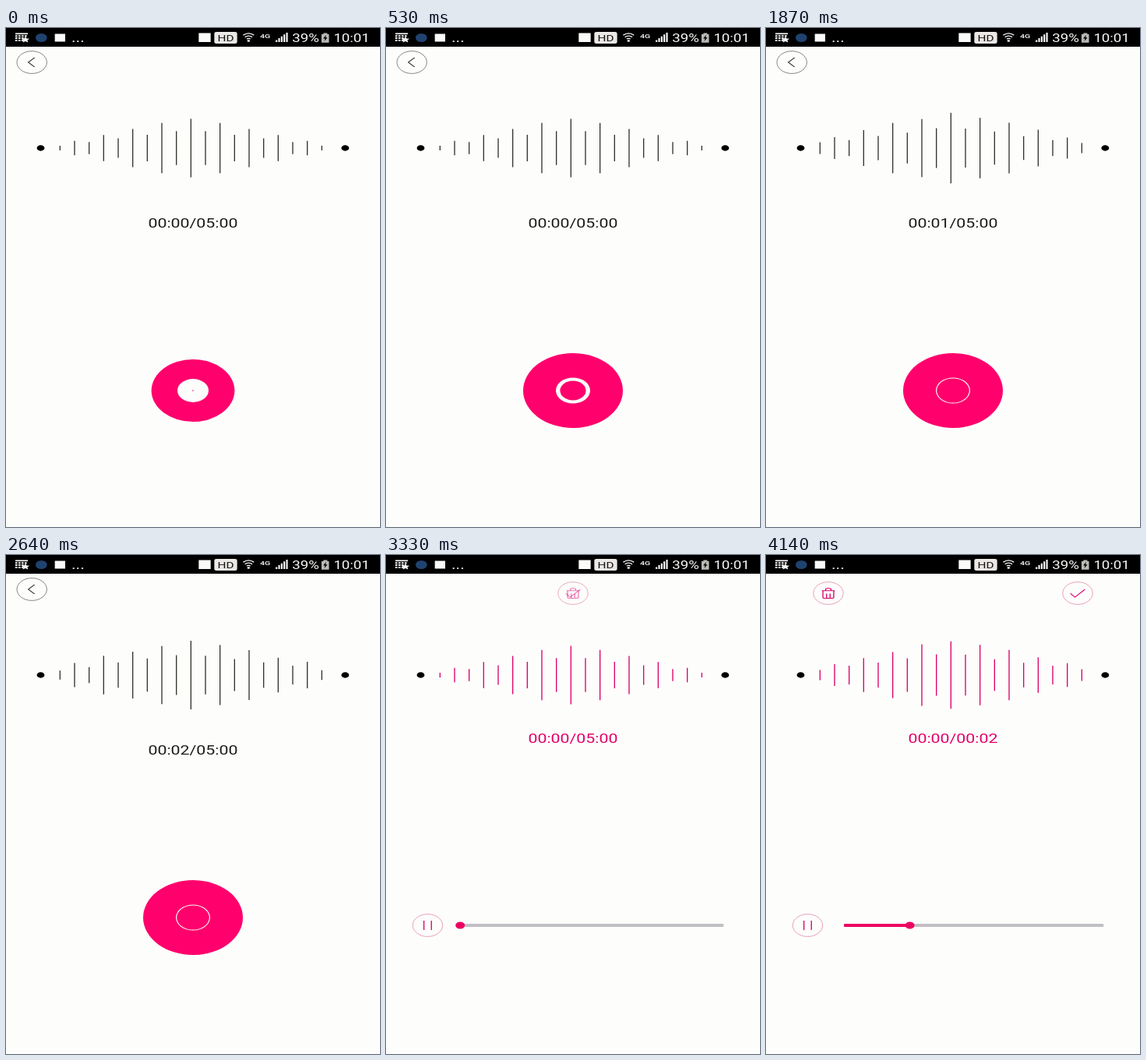
An HTML page for the animation above (4180 ms loop, 480 px wide and 640 px high).

```html
<!DOCTYPE html>
<html lang="en">
<head>
<meta charset="utf-8">
<title>Voice recorder</title>
<style>
  html, body { margin: 0; width: 100%; height: 100%; overflow: hidden; background: #fdfdfc; }
  svg { display: block; width: 100vw; height: 100vh; }
  text { font-family: Roboto, "Noto Sans", sans-serif; }
  .line { fill: none; stroke-width: 1; }
  .thin { fill: none; stroke-width: .6; }
  .red { stroke: #dc0068; }
  .rim { stroke: #e0789f; }
</style>
</head>
<body>
<!-- The phone screen is 360 x 640 dp, widened to fill the stage. -->
<svg viewBox="0 0 360 640" preserveAspectRatio="none">
  <rect width="360" height="640" fill="#fdfdfc"/>

  <g id="status" fill="#fafaf8">
    <rect width="360" height="24" fill="#000"/>
    <g class="line" stroke="#fafaf8">
      <path d="M9 7.3H21" stroke-width="1.7"/>
      <path d="M9 10.2H21M9 13H17M9 16H17" stroke-width="1.9" stroke-dasharray="2 1"/>
      <path d="M228.3 9.3Q233.5 4.6 238.7 9.3M230 11.8Q233.5 8.6 237 11.8M231.7 14.1Q233.5 12.6 235.3 14.1" stroke-width="1.2"/>
      <path id="signal" stroke-width="1.6"/>
    </g>
    <path d="M18.7 10.8l1.2 2.6 2.8.3-2.1 1.9.6 2.8-2.5-1.4-2.5 1.4.6-2.8-2.1-1.9 2.8-.3z"/>
    <circle cx="34" cy="12.5" r="5.5" fill="#1f4370"/>
    <rect x="47" y="7.5" width="10" height="10"/>
    <text x="63" y="17.7" font-size="16">...</text>
    <rect x="185.5" y="6.5" width="11.5" height="11.5"/>
    <rect x="200.5" y="5" width="22" height="15" rx="2" fill="#ebe8e6"/>
    <text x="211.6" y="16.6" font-size="11.5" text-anchor="middle" fill="#111">HD</text>
    <circle cx="233.5" cy="16.5" r="1.3"/>
    <text x="244.5" y="13" font-size="8" font-weight="500">4G</text>
    <text x="275.5" y="17.7" font-size="14">39%</text>
    <path d="M305.5 6.5h3.8v1.5h1.6v10.8h-7.2V8h1.8z" fill="#b9b9b5"/>
    <path d="M308.3 8.8l-3 4.6h1.8l-.7 3.6 3-4.7h-1.8z" fill="#000"/>
    <text x="315.3" y="17.7" font-size="14">10:01</text>
  </g>

  <circle cx="33.4" cy="154" r="3.7"/>
  <circle cx="326.5" cy="154" r="3.7"/>
  <path id="wave" class="line"/>
  <text id="timer" x="180" font-size="16" text-anchor="middle"></text>

  <g id="record">
    <g class="thin" stroke="#55554c">
      <circle cx="24.9" cy="44" r="14.4"/>
      <path d="M27.5 38L21.5 44L27.5 50" stroke="#222" stroke-width="1"/>
    </g>
    <g transform="translate(180 465)">
      <circle id="disc" fill="#ff006c"/>
      <circle id="hole" fill="#fdfdfc"/>
      <circle id="core" fill="#ff006c"/>
    </g>
  </g>

  <g id="play">
    <g id="bin">
      <circle class="thin rim" r="14.4"/>
      <path class="line red" d="M-6.3 -3.2H6.3M-2.6 -3.2V-4.4Q-2.6 -6.2 -.9 -6.2H.9Q2.6 -6.2 2.6 -4.4V-3.2M-5.2 -3.2V5Q-5.2 6.6 -3.6 6.6H3.6Q5.2 6.6 5.2 5V-3.2M-1.7 .4V6M1.7 .4V6"/>
    </g>
    <g id="tick">
      <circle class="thin rim" r="14.4"/>
      <path class="line red" d="M-7 .3L-2.6 5L7 -4.8"/>
    </g>
    <g transform="translate(40.1 475)">
      <circle class="thin rim" r="14.4"/>
      <path class="line red" d="M-3.6 -6V6M3.6 -6V6"/>
    </g>
    <rect x="75" y="473" width="250" height="4" rx="1.2" fill="#c1bfc4"/>
    <rect id="bar" x="75" y="473" height="4" rx="1.2" fill="#ee0062"/>
    <circle id="knob" cy="475" r="4.5" fill="#ee0062"/>
  </g>
</svg>

<script>
const LOOP = 4180;
const RECORD = 1100, STOP = 3290, SPLIT = 3335, PLAY = 3618, SOUND = 3850;
const LEVEL_STEP = 154, SEEK_STEP = 58;

const $ = id => document.getElementById(id);
const set = (id, attrs) => {
  for (const key in attrs) $(id).setAttribute(key, attrs[key]);
};
const clamp = v => Math.min(1, Math.max(0, v));
const decelerate = t => 1 - (1 - t) ** 2;
const overshoot = t => (t - 1) ** 2 * (3 * (t - 1) + 2) + 1;
const random = seed => {
  const v = Math.sin(seed * 12.9898) * 43758.5453;
  return v - Math.floor(v);
};
const repeat = (n, fn) => Array.from({ length: n }, (_, i) => fn(i)).join("");

// Tall and short bars alternate, each kind rising evenly to the middle.
function wavePath(ms) {
  const level = Math.floor((ms - RECORD) / LEVEL_STEP);
  const loud = (ms >= RECORD && ms < STOP) || ms >= SOUND;
  return repeat(19, i => {
    const k = 9 - Math.abs(9 - i);
    const tall = k % 2;
    const rest = tall ? Math.min(37.5, 5.3 + 3.85 * k) : 2.9 + 2.37 * k;
    const grow = (tall ? 6.2 : 3.6) * (0.7 + 0.6 * random(level * 19 + i + 1));
    const h = rest + (loud ? grow : 0);
    return `M${52 + 14 * i} ${154 - h}v${2 * h}`;
  });
}

function timerText(ms) {
  if (ms >= STOP) return ms < 3450 ? "00:00/05:00" : "00:00/00:02";
  return `00:0${Math.max(0, Math.floor((ms - 610) / 1000))}/05:00`;
}

function draw(ms) {
  const playing = ms >= STOP;
  set("wave", { d: wavePath(ms), stroke: playing ? "#dc0068" : "#33332d" });
  set("timer", { y: playing ? 241 : 256, fill: playing ? "#e20068" : "#1c1c18" });
  $("timer").textContent = timerText(ms);
  set("record", { visibility: playing ? "hidden" : "visible" });
  set("play", { visibility: playing ? "visible" : "hidden" });

  const grow = decelerate(clamp(ms / 530));
  set("disc", { r: 40 + 8 * grow });
  set("hole", { r: 15 + 1.5 * grow });
  set("core", { r: 15.6 * decelerate(clamp((ms + 20) / 1000)) });

  const split = clamp((ms - SPLIT) / 435);
  const apart = 120 * overshoot(split);
  const opacity = clamp(0.5 + split);
  set("bin", { transform: `translate(${180 - apart} 49)`, opacity });
  set("tick", { transform: `translate(${180 + apart} 49)`, opacity });

  const played = Math.floor((ms - PLAY) / SEEK_STEP) * SEEK_STEP;
  const x = 71.4 + 257 * clamp(played / 2000);
  set("bar", { width: Math.max(0, x - 75) });
  set("knob", { cx: x });
}

set("signal", { d: repeat(5, i => `M${260.4 + 2.5 * i} 18v${-2.5 - 2.4 * i}`) });

const start = performance.now();
function frame() {
  draw((performance.now() - start) % LOOP);
  requestAnimationFrame(frame);
}
draw(0);
requestAnimationFrame(frame);
</script>
</body>
</html>
```
